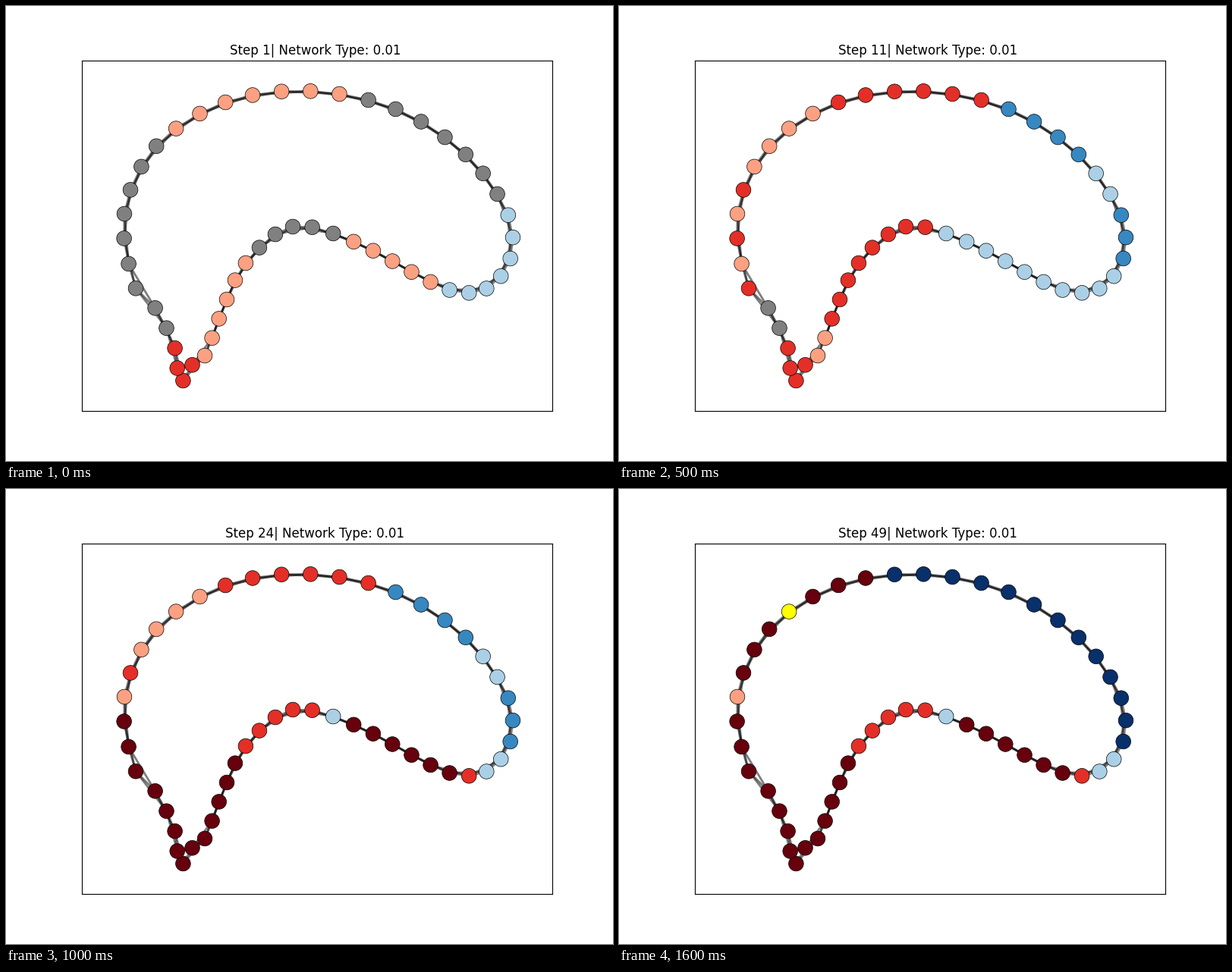
Animation of 800x600 px, one loop 1.7 s. Source, as a matplotlib script:

```python
import matplotlib.pyplot as plt
import numpy as np
from matplotlib.animation import FuncAnimation
from matplotlib.collections import LineCollection

N = 50      # nodes on the ring, counted clockwise from the lower tip
MIXED = 9   # marker for the undecided node

# Key nodes of the ring: index -> place in stage pixels
KEYS = {
    0: (233.4, 494), 1: (225.7, 477.5), 2: (222.6, 451.2), 4: (196.6, 398.3),
    5: (171, 372.3), 8: (156, 274), 11: (198.2, 184.8), 14: (289.2, 127),
    17: (401.3, 112.3), 20: (513.5, 136), 23: (605.8, 195.8),
    26: (661.8, 275.7), 28: (664.7, 333), 30: (633.3, 372.5),
    32: (584.6, 374.5), 37: (458.2, 310.8), 40: (378, 291), 43: (315.9, 339),
    46: (280.7, 412.4), 48: (262, 461), 49: (245.5, 473.3),
}

# Spread of opinions: step, opinion (red < 0 < blue), nodes that adopt it
SPREAD = [
    (1, -1, range(12, 19)), (1, 1, range(26, 33)), (1, -1, range(33, 38)),
    (1, -1, range(43, 49)), (1, -2, range(49, 53)),
    (2, -1, range(5, 12)), (2, 1, range(20, 26)), (2, -1, range(38, 43)),
    (3, 2, range(20, 24)), (3, -2, range(39, 46)),
    (4, -2, range(5, 10, 2)), (4, -2, range(14, 20)),
    (9, 2, range(26, 29)), (9, -2, range(46, 47)),
    (11, 1, range(33, 39)),
    (13, -3, range(48, 58)),
    (18, -2, range(31, 32)), (18, -3, range(32, 38)),
    (24, -3, range(44, 48)),
    (26, 3, range(23, 29)),
    (29, -2, range(12, 14)),
    (39, 3, range(16, 23)),
    (49, -3, range(9, 16)), (49, MIXED, range(12, 13)),
]

# Every fifth step is shown, and each step where opinions change
STEPS = sorted({*range(4, N, 5)} | {step for step, _, _ in SPREAD})


def ring():
    """Closed cubic curve through the key nodes, read at every index."""
    index = np.array(list(KEYS))
    point = np.array(list(KEYS.values()))
    gap = np.roll(index, -1) - index
    gap[-1] += N
    span = gap + np.roll(gap, 1)
    slope = (np.roll(point, -1, 0) - np.roll(point, 1, 0)) / span[:, None]
    nodes = []
    for k, size in enumerate(gap):
        nxt = (k + 1) % len(index)
        for t in np.arange(size) / size:
            ease = t * t * (3 - 2 * t)
            nodes.append((1 - ease) * point[k] + ease * point[nxt]
                         + size * t * (1 - t) * ((1 - t) * slope[k]
                                                 - t * slope[nxt]))
    return np.array(nodes)


def opinions(step):
    values = np.zeros(N, int)
    for when, value, members in SPREAD:
        if when <= step:
            values[np.array(members) % N] = value
    return values


def color(value):
    if value == 0:
        return "gray"
    if value == MIXED:
        return "yellow"
    shades = plt.cm.Blues if value > 0 else plt.cm.Reds
    return shades(abs(value) / 3)


fig, ax = plt.subplots(figsize=(8, 6), dpi=100)
ax.set(xlim=(100, 720), ylim=(534, 72), xticks=[], yticks=[])

# Each node is linked to its two nearest neighbours on either side
nodes = ring()
links = [(nodes[i], nodes[(i + d) % N]) for i in range(N) for d in (1, 2)]
ax.add_collection(LineCollection(links, colors="black", linewidths=2,
                                 alpha=0.5, zorder=1))
dots = ax.scatter(*nodes.T, s=200, c="gray", edgecolors="black",
                  linewidths=0.5, zorder=2)
title = ax.set_title("")


def update(frame):
    step = STEPS[frame]
    dots.set_facecolor([color(v) for v in opinions(step)])
    # The trailing space sets the line a little left of centre
    title.set_text(f"Step {step}| Network Type: 0.01 ")
    return dots, title


anim = FuncAnimation(fig, update, frames=len(STEPS), interval=100,
                     repeat=True, repeat_delay=0, blit=False)
plt.show()
```
